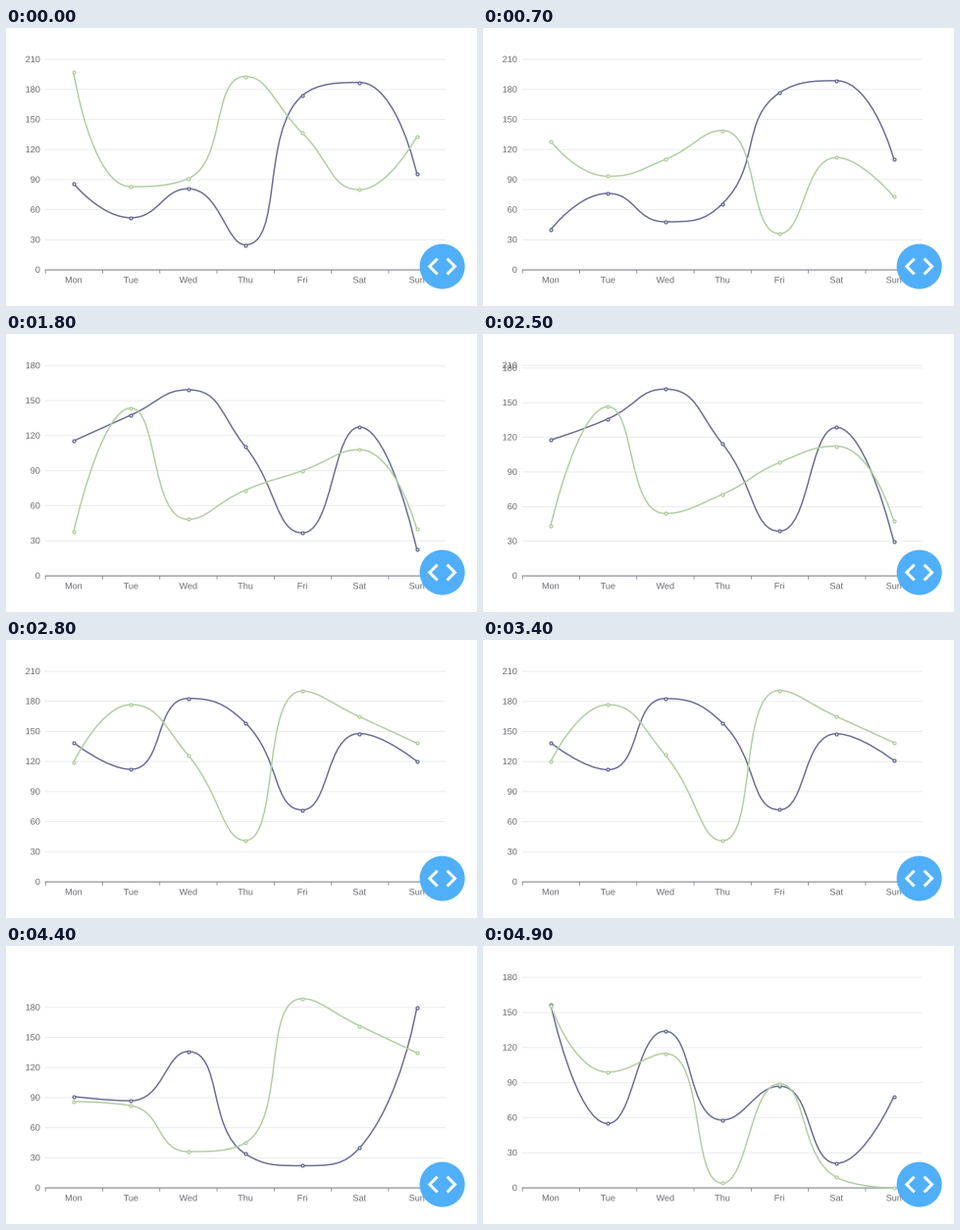
Write a matplotlib script that moves like this. It is 480x284 px and loops after 5100 ms.

```python
import math

import matplotlib.pyplot as plt
import numpy as np
from matplotlib.animation import FuncAnimation
from matplotlib.patches import Circle, PathPatch, Polygon
from matplotlib.path import Path
from matplotlib.textpath import TextPath

W, H, DPI = 480, 284, 64
PX = 72 / DPI                      # points per pixel
LEFT, RIGHT, TOP, BASE = 39.8, 447.8, 32.1, 247.1
DAYS = ["Mon", "Tue", "Wed", "Thu", "Fri", "Sat", "Sun"]
BAND = (RIGHT - LEFT) / len(DAYS)
XS = LEFT + BAND * (np.arange(len(DAYS)) + 0.5)
SMOOTH, TICK, FONT = 0.5, 30, 9.1
STEP_MS, FRAMES = 100, 51
FIRST_UPDATE, PERIOD, DURATION = 360, 1000, 500

COLORS = ["#686b94", "#b2cda0"]
TEXT, AXIS, GRID = "#696b70", "#7d7f86", "#e9eaec"

plt.rcParams["font.family"] = "Liberation Sans"


def week(**key_days):
    """Seven values from key days; days left out lie on the straight line."""
    return np.interp(range(len(DAYS)), [DAYS.index(d) for d in key_days],
                     list(key_days.values()))


STATES = [
    (week(Mon=86, Tue=52, Wed=81, Thu=25, Fri=174, Sat=187, Sun=96),
     week(Mon=197, Tue=83, Wed=91, Thu=193, Sat=80, Sun=133)),
    (week(Mon=33, Tue=80, Wed=43, Thu=72, Fri=177, Sat=189, Sun=113),
     week(Mon=118, Tue=95, Thu=131, Fri=21, Sat=117, Sun=64)),
    (week(Mon=116, Wed=160, Thu=111, Fri=36, Sat=127, Sun=22),
     week(Mon=37, Tue=144, Wed=48, Thu=73, Sat=108, Sun=40)),
    (week(Mon=139, Tue=112, Wed=183, Thu=159, Fri=72, Sat=148, Sun=121),
     week(Mon=120, Tue=177, Wed=127, Thu=41, Fri=191, Sun=139)),
    (week(Mon=91, Tue=87, Wed=136, Thu=34, Fri=22, Sat=40, Sun=180),
     week(Mon=86, Tue=82, Wed=36, Thu=45, Fri=189, Sun=135)),
    (week(Mon=157, Tue=55, Wed=134, Thu=58, Fri=87, Sat=21, Sun=78),
     week(Mon=156, Tue=99, Wed=115, Thu=4, Fri=89, Sat=9, Sun=0)),
]


def axis_max(state):
    """The first tick at or above the largest value."""
    return math.ceil(np.max(state) / TICK) * TICK


def to_y(value, top_value):
    return BASE - value / top_value * (BASE - TOP)


def mix(a, b, share):
    return a + (b - a) * share


def ease(p):
    """Cubic in-out."""
    return 4 * p ** 3 if p < 0.5 else 1 - 4 * (1 - p) ** 3


def progress(ms):
    """Previous state, next state and eased share between them."""
    if ms < FIRST_UPDATE:
        return STATES[0], STATES[0], 1.0
    k = min(int((ms - FIRST_UPDATE) // PERIOD), len(STATES) - 2)
    p = min((ms - FIRST_UPDATE - k * PERIOD) / DURATION, 1)
    return STATES[k], STATES[k + 1], ease(p)


def smooth_path(points):
    """Bezier path whose control points stay within neighbouring points."""
    verts = [points[0]]
    out = points[0]
    for i in range(1, len(points)):
        prev, cur = points[i - 1], points[i]
        inward, next_out = cur, cur
        if i + 1 < len(points):
            nxt = points[i + 1]
            len_prev = np.hypot(*(cur - prev))
            len_next = np.hypot(*(nxt - cur))
            next_out = cur + (nxt - prev) * SMOOTH * len_next / (len_next + len_prev)
            next_out = np.clip(next_out, np.minimum(cur, nxt), np.maximum(cur, nxt))
            inward = cur - (next_out - cur) * len_prev / len_next
            inward = np.clip(inward, np.minimum(prev, cur), np.maximum(prev, cur))
            next_out = cur + (cur - inward) * len_next / len_prev
        verts += [out, inward, cur]
        out = next_out
    return Path(verts, [Path.MOVETO] + [Path.CURVE4] * (len(verts) - 1))


def text_path(text, x, baseline, anchor):
    """Text outline; anchor 0.5 centres it on x, 1 ends it there."""
    glyphs = TextPath((0, 0), text, size=FONT)
    box = glyphs.get_extents()
    shift = x - mix(box.x0, box.x1, anchor)
    return Path(glyphs.vertices * (1, -1) + (shift, baseline), glyphs.codes)


fig = plt.figure(figsize=(W / DPI, H / DPI), dpi=DPI, facecolor="white")
ax = fig.add_axes([0, 0, 1, 1])
ax.set_xlim(0, W)
ax.set_ylim(H, 0)
ax.axis("off")


def stroke(xs, ys, color, width, z):
    return ax.plot(xs, ys, color=color, lw=width * PX, zorder=z,
                   solid_capstyle="butt", snap=False)[0]


def label(text, x, baseline, anchor):
    return ax.add_patch(PathPatch(text_path(text, x, baseline, anchor), fc=TEXT,
                                  ec="none", snap=False, zorder=2))


ticks = range(0, max(map(axis_max, STATES)) + 1, TICK)
grid_lines = {v: stroke([LEFT, RIGHT], [0, 0], GRID, 0.9, 1) for v in ticks}
tick_labels = {v: label(str(v), 0, 0, 1) for v in ticks}

stroke([LEFT, RIGHT], [BASE, BASE], AXIS, 1, 2)
for i in range(len(DAYS) + 1):
    x = LEFT + 0.4 + BAND * i
    stroke([x, x], [BASE, BASE + 3.6], AXIS, 0.8, 2)
for x, day in zip(XS, DAYS):
    label(day, x, 260.4, 0.5)

curves, dots = [], []
for n, color in enumerate(COLORS):
    curve = PathPatch(Path([(0, 0), (1, 1)]), fc="none", ec=color, lw=1.45 * PX,
                      joinstyle="bevel", capstyle="butt", snap=False, zorder=3 + n)
    curves.append(ax.add_patch(curve))
    dots += ax.plot(XS, XS, "o", ms=2.9 * PX, mew=1.3 * PX, mfc="white", mec=color,
                    snap=False, zorder=3.5 + n)

# Round button with a pair of chevrons
CX, CY, UNIT = 444.6, 243.6, 1.5
ax.add_patch(Circle((CX, CY), 23, fc="#4faffa", ec="none", zorder=8))
chevron = np.array([(2.6, 4.6), (7.2, 0), (2.6, -4.6), (4, -6), (10, 0), (4, 6)]) * UNIT
for side in (-1, 1):
    ax.add_patch(Polygon(chevron * (side, 1) + (CX, CY), fc="white", ec="none", zorder=9))


def update(frame):
    old, new, share = progress(frame * STEP_MS)
    old_max, new_max = axis_max(old), axis_max(new)

    # Kept ticks glide to the new scale; others appear or vanish at once
    for v in ticks:
        end = to_y(v, new_max)
        y = mix(to_y(v, old_max), end, share) if v <= old_max else end
        tick_labels[v].set_path(text_path(str(v), 34.5, y + 2.9, 1))
        grid_lines[v].set_ydata([y, y])
        for part in (tick_labels[v], grid_lines[v]):
            part.set_visible(v <= new_max)

    for n in range(len(COLORS)):
        ys = mix(to_y(old[n], old_max), to_y(new[n], new_max), share)
        curves[n].set_path(smooth_path(np.column_stack([XS, ys])))
        dots[n].set_ydata(ys)
    return [*tick_labels.values(), *grid_lines.values(), *curves, *dots]


animation = FuncAnimation(fig, update, frames=FRAMES, interval=STEP_MS,
                          repeat=True, repeat_delay=0, blit=False)
plt.show()
```
